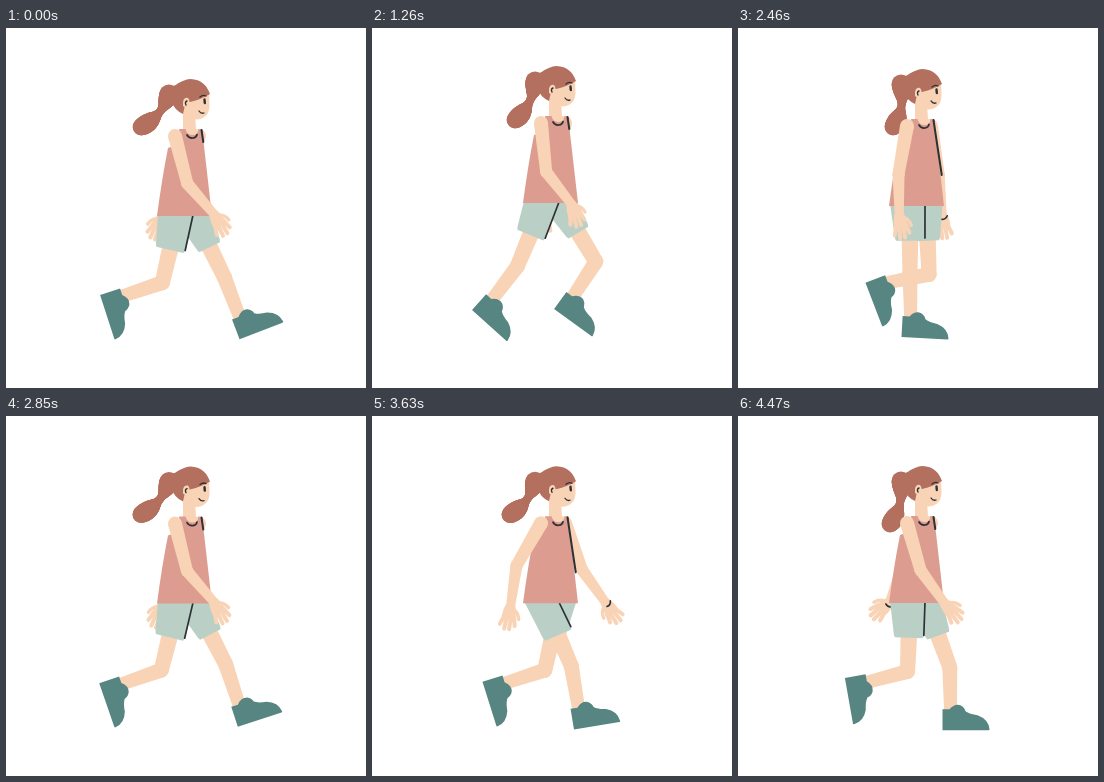
An HTML page with a canvas that plays this animation: 360 px wide and 360 px high, repeating every 4500 ms.

```html
<!DOCTYPE html>
<html lang="en">
<head>
<meta charset="utf-8">
<title>Walking</title>
<style>
  html, body { margin: 0; width: 100%; height: 100%; overflow: hidden; background: #fff; }
  canvas { display: block; width: 360px; height: 360px; }
</style>
</head>
<body>
<canvas id="stage" width="360" height="360"></canvas>
<script>
const ctx = document.getElementById('stage').getContext('2d');
const LOOP = 4500, STEP = 30, CYCLE = 1430;
const NEAR_LAG = 0.465;
const SKIN = '#f9d3b5', SHIRT = '#dc9d90', HAIR = '#b4705f',
      SHORTS = '#bad0c7', SHOE = '#578581', DARK = '#2d3136';

// Rows: [phase, ...values]
const BOB = [[0, 0], [.06, 0], [.126, -1], [.22, -6], [.287, -9], [.345, -11], [.44, -5.5],
  [.52, -1], [.6, -2], [.72, -10], [.79, -14], [.83, -14.7], [.881, -13], [.95, -5]];
// thigh, shin, foot, in degrees
const LEG = [[0, 26, 21, -21], [.126, 20, 1, 0], [.255, 0, 1, 3], [.287, -9, -6, 7],
  [.325, -21, -22, 28], [.416, -22.5, -37, 42], [.44, -27.5, -51, 49], [.535, -13, -71.5, 72],
  [.661, -2, -75, 80], [.72, 2.5, -79, 69], [.79, 27, -52, 53], [.822, 38, -48, 57],
  [.881, 31, -33, 36], [.975, 31, 3, -2]];
// upper arm, forearm, hand
const NEAR_ARM = [[0, 14.5, 41, 30], [.126, 16, 36, 42], [.287, -12, 7, 10], [.44, -35, -8, -12],
  [.72, -10, 1, 10], [.79, 2, 27, 31], [.881, 6, 38, 20]];
const FAR_ARM = [[0, -30, -18, -25], [.126, -34, -20, -50], [.287, 8, 7, 10], [.44, 22, 44, 41],
  [.72, 9, 5, 5], [.79, -3, 0, 0], [.881, -16, -8, -10]];
const TAIL = [[0, 135, 99], [.126, 152, 109], [.287, 142, 105], [.44, 125, 82], [.5, 130, 92],
  [.6, 150, 109], [.72, 155, 109], [.79, 147, 109], [.881, 143, 105]];

const wrap = p => p - Math.floor(p);

// Periodic cubic through the rows
function sample(rows, phase) {
  const p = wrap(phase), n = rows.length;
  const row = k => rows[(k + n) % n];
  const at = k => row(k)[0] + Math.floor(k / n);
  let i = n - 1;
  while (i > 0 && rows[i][0] > p) i--;
  const t0 = at(i), h = at(i + 1) - t0, u = (p - t0) / h;
  return rows[i].slice(1).map((a, j) => {
    const v = k => row(k)[j + 1];
    const b = v(i + 1);
    const m0 = (b - v(i - 1)) / (at(i + 1) - at(i - 1)) * h;
    const m1 = (v(i + 2) - a) / (at(i + 2) - t0) * h;
    const u2 = u * u, u3 = u2 * u;
    return (2 * u3 - 3 * u2 + 1) * a + (u3 - 2 * u2 + u) * m0
         + (3 * u2 - 2 * u3) * b + (u3 - u2) * m1;
  });
}

const rad = d => d * Math.PI / 180;
const reach = ([x, y], deg, len) => [x + len * Math.sin(rad(deg)), y + len * Math.cos(rad(deg))];

function fill(path, color) {
  ctx.fillStyle = color;
  ctx.fill(new Path2D(path));
}

function line(path, color, width) {
  ctx.strokeStyle = color;
  ctx.lineWidth = width;
  ctx.stroke(new Path2D(path));
}

function disc([x, y], r) {
  ctx.beginPath();
  ctx.arc(x, y, r, 0, 7);
  ctx.fill();
}

function polygon(points) {
  ctx.beginPath();
  points.forEach(p => ctx.lineTo(...p));
  ctx.closePath();
  ctx.fill();
}

// Tapered round segment
function bone(a, b, ra, rb) {
  const d = Math.atan2(b[1] - a[1], b[0] - a[0]);
  const nx = -Math.sin(d), ny = Math.cos(d);
  polygon([[a[0] + nx * ra, a[1] + ny * ra], [b[0] + nx * rb, b[1] + ny * rb],
           [b[0] - nx * rb, b[1] - ny * rb], [a[0] - nx * ra, a[1] - ny * ra]]);
  disc(a, ra);
  disc(b, rb);
}

function placed([x, y], deg, draw) {
  ctx.save();
  ctx.translate(x, y);
  ctx.rotate(rad(deg));
  draw();
  ctx.restore();
}

function drawLeg(hip, phase) {
  const [thigh, shin, foot] = sample(LEG, phase);
  const knee = reach(hip, thigh, 69.5), ankle = reach(knee, shin, 41);
  ctx.fillStyle = SKIN;
  bone(hip, knee, 9, 7.5);
  bone(knee, ankle, 7.5, 6.5);
  placed(ankle, foot, () => {
    line('M-7,25 L38,25', '#fff', 6);
    fill('M-8,1 L-1,1 Q4,-5 10,-3 Q14,-1 15,3 Q19,6 27,7 Q38,11 39,21 Q39,22 38,22 L-8,22 Z', SHOE);
  });
  return thigh;
}

function drawShorts(hip, thigh, back, front, half) {
  const hem = reach(hip, thigh, 33);
  const dx = Math.cos(rad(thigh)) * half, dy = -Math.sin(rad(thigh)) * half;
  const hemFront = [hem[0] + dx, hem[1] + dy], hemBack = [hem[0] - dx, hem[1] - dy];
  const low = reach(hemFront, thigh - 20, 3), lowBack = reach(hemBack, thigh + 20, 3);
  ctx.fillStyle = SHORTS;
  polygon([[back, hip[1] - 1], [front, hip[1] - 1], hemFront, low, lowBack, hemBack]);
  return hemFront;
}

function drawArm(shoulder, [upper, fore, hand], flip) {
  const elbow = reach(shoulder, upper, 49), wrist = reach(elbow, fore, 41);
  ctx.fillStyle = SKIN;
  bone(shoulder, elbow, 7, 6);
  bone(elbow, wrist, 6, 4.5);
  placed(wrist, -hand, () => {
    ctx.scale(flip, 1);
    fill('M-4.5,-2 Q-8,7 -7,13 L6,13 Q7,5 4.5,-2 Z', SKIN);
    line('M-5,11 L-8,19 M-2,12 L-3,23 M2,12 L2,23 M5,10 L7,19', SKIN, 4);
    line('M4,3 Q9,6 10,12', SKIN, 3.5);
    if (flip < 0) line('M-5,1 Q-3,5 1,4', DARK, 1.6);
  });
}

function drawTail([x, y]) {
  const kx = 150 + (x - 125) * .57, ky = 80 + (y - 82) * .5;
  ctx.fillStyle = HAIR;
  for (let i = 0; i <= 60; i++) {
    const s = i / 60, q = 1 - s;
    disc([q * q * 163 + 2 * q * s * kx + s * s * x, q * q * 66 + 2 * q * s * ky + s * s * y],
         6.7 + 2.8 * Math.cos(7.2 * s));
  }
}

function drawHead() {
  fill('M177,80 L189,86 L190,101 Q196,103 196,112 L176,112 L177,101 Z', SKIN);
  fill('M179,66 Q190,55 203,64 L203.5,76 Q204,90 191,91.5 Q182,91 178,82 Z', SKIN);
  fill('M204,66 C200,54 191,51 184,51 C175,52 171,57 167,58 L165,72 Q168,82 177,86 '
     + 'L179,77 Q180,73 184,74 Q196,71 204,66 Z', HAIR);
  fill('M177,74 Q178,69 182,70 Q185,73 182,78 Q179,80 177,78 Z', SKIN);
  line('M181,73 Q178.5,74 180,77', DARK, 1.4);
  line('M198.5,71.5 L198.8,75', DARK, 2.4);
  line('M194,69 Q197,66.5 200,68', DARK, 1.3);
  line('M193,83 Q195,86 198,85', DARK, 1.3);
}

function drawShirt(strap) {
  fill('M173,101 L179.5,101 Q181,107 187,107 Q192,107 192.5,101 L197,102 Q197,112 198,118 '
     + 'L206,188 L151,188 Q156,150 162,120 Q176,116 173,101 Z', SHIRT);
  line('M181,107 Q183,110.5 187,110 Q190.5,109.5 191,106.5', DARK, 1.7);
  line(`M195.5,102 L${195.5 + strap * .15},${102 + strap}`, DARK, 2);
}

function draw(ms) {
  const phase = ms / CYCLE;
  const [bob] = sample(BOB, phase);
  const nearHip = [172, 187 + bob], farHip = [188, 187 + bob];
  const farArm = sample(FAR_ARM, phase);
  const strap = 12 + 43 * Math.min(1, Math.max(0, (farArm[0] + 6) / 12));

  ctx.fillStyle = '#fff';
  ctx.fillRect(0, 0, 360, 360);
  ctx.lineCap = ctx.lineJoin = 'round';

  drawArm([193, 108 + bob], farArm, -1);
  const farThigh = drawLeg(farHip, phase);
  drawShorts(farHip, farThigh, 166, 204.5, 12.5);
  const nearThigh = drawLeg(nearHip, phase - NEAR_LAG);
  const seam = drawShorts(nearHip, nearThigh, 152, 187, 15);
  line(`M187,${187 + bob} L${seam}`, DARK, 1.7);

  ctx.save();
  ctx.translate(0, bob);
  drawTail(sample(TAIL, phase));
  drawHead();
  drawShirt(strap);
  ctx.restore();

  drawArm([169, 108 + bob], sample(NEAR_ARM, phase), 1);
}

const start = performance.now();
function tick() {
  const t = (performance.now() - start) % LOOP;
  draw(Math.floor(t / STEP) * STEP);
  requestAnimationFrame(tick);
}
tick();
</script>
</body>
</html>
```
